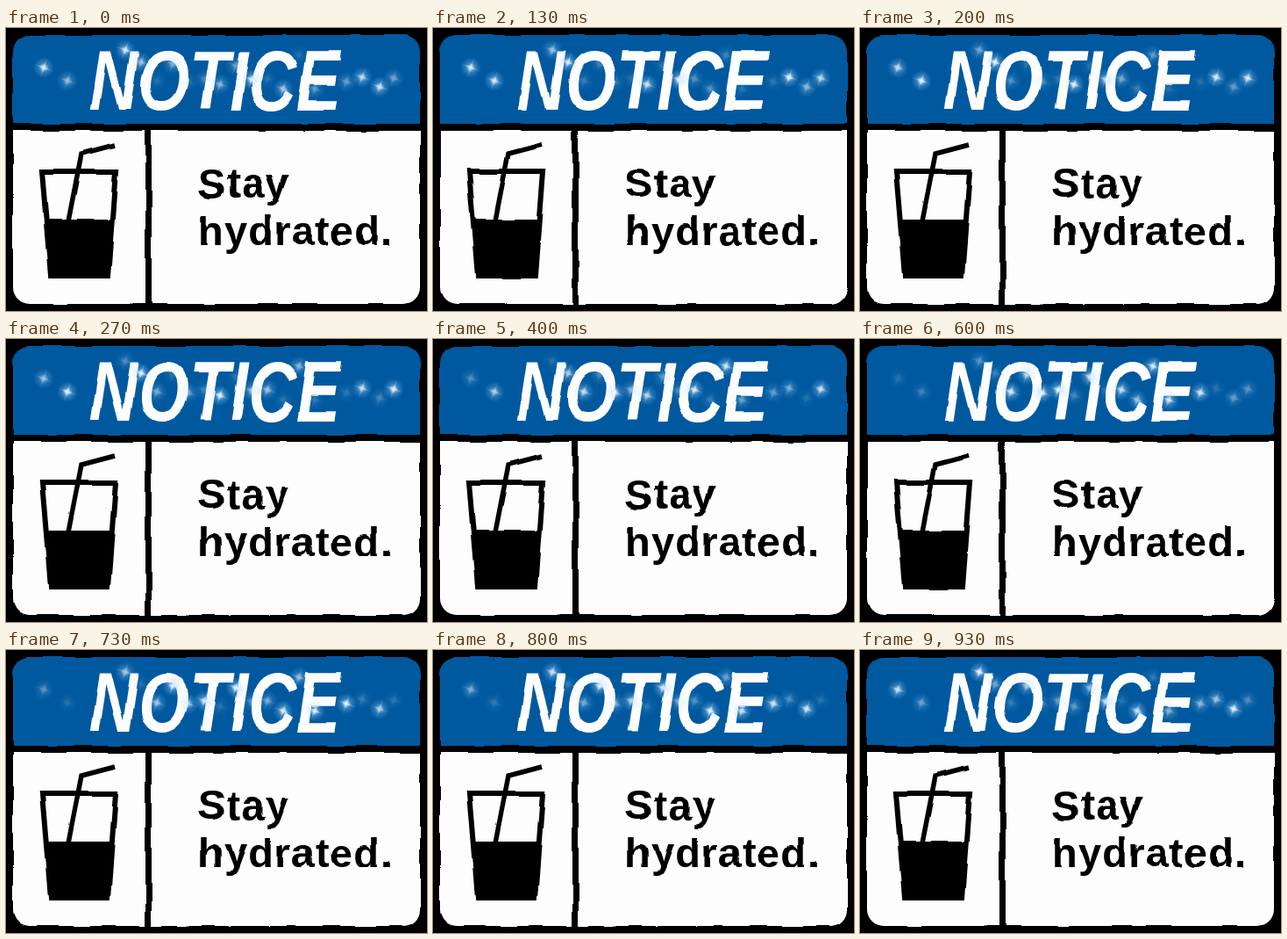
These frames come from a looping animation (480 by 322 pixels, 0.99 s). An HTML page:

```html
<!DOCTYPE html>
<html lang="en">
<head>
<meta charset="utf-8">
<title>Notice</title>
<style>
  html, body { margin: 0; width: 100%; height: 100%; overflow: hidden; background: #000; }
  svg { display: block; width: 100%; height: 100%; }
  text { font-family: "Liberation Sans", Arial, sans-serif; font-weight: bold; }
  .title { font-size: 97px; font-style: italic; fill: #fdfdfd; }
  .body { font-size: 47px; letter-spacing: 1.2px; }
</style>
</head>
<body>
<svg viewBox="0 0 480 322">
  <defs>
    <filter id="wobble" filterUnits="userSpaceOnUse" x="0" y="0" width="480" height="322" color-interpolation-filters="sRGB">
      <feTurbulence id="noise" type="fractalNoise" baseFrequency=".028" numOctaves="1" result="n"/>
      <feGaussianBlur in="SourceGraphic" stdDeviation=".55" result="soft"/>
      <feDisplacementMap in="soft" in2="n" scale="5" xChannelSelector="R" yChannelSelector="G"/>
      <feGaussianBlur stdDeviation=".35"/>
    </filter>
    <radialGradient id="glow">
      <stop offset="0" stop-color="#fff"/>
      <stop offset=".15" stop-color="#e4f2ff" stop-opacity=".85"/>
      <stop offset=".45" stop-color="#b4dcff" stop-opacity=".32"/>
      <stop offset="1" stop-color="#9cd0ff" stop-opacity="0"/>
    </radialGradient>
    <g id="star" fill="url(#glow)">
      <circle r="12"/>
      <path d="M0-13 1.2 -1.2 13 0 1.2 1.2 0 13 -1.2 1.2 -13 0 -1.2 -1.2Z" transform="rotate(20)"/>
    </g>
  </defs>
  <g filter="url(#wobble)">
    <rect width="480" height="322"/>
    <path fill="#00599f" d="M8 109V27A19 19 0 0 1 27 8H453A19 19 0 0 1 472 27V109Z"/>
    <path fill="#fdfdfd" d="M8 117H159V314H27A19 19 0 0 1 8 295ZM166 117H472V295A19 19 0 0 1 453 314H166Z"/>
    <text class="title" transform="translate(95.5 92.5) scale(.78 1)">NOTICE</text>
    <text class="body" x="219" y="193">Stay</text>
    <text class="body" x="219" y="247">hydrated.</text>
    <g fill="none" stroke="#000" stroke-width="6">
      <path d="M41 163H125L116 282H51Z"/>
      <path stroke-width="5.5" d="M71 220 86 143 124 133"/>
    </g>
    <path d="M45 218H122L118 284H49Z"/>
  </g>
  <g id="stars"></g>
</svg>
<script>
const LOOP = 990, STEP = 1000 / 15;

let seed = 7;
const random = () => (seed = seed * 16807 % 2147483647) / 2147483647;

// bright stars beside the title: x, y, phase of peak brightness
const stars = [
  [43, 45, .06], [70, 60, .22], [388, 61, .7],
  [406, 56, .14], [426, 67, .9], [442, 57, .28]
];
// a scatter of stars around the letters
for (let x = 136; x < 370; x += 18) stars.push([x, 25 + 48 * random(), random()]);

const noise = document.getElementById("noise");
const layer = document.getElementById("stars");
const sparkles = stars.map(([x, y, peak]) => {
  const el = document.createElementNS("http://www.w3.org/2000/svg", "use");
  el.setAttribute("href", "#star");
  el.setAttribute("transform", `translate(${x} ${y})`);
  layer.append(el);
  return { el, peak };
});

let shown = -1;
function draw(now) {
  const step = Math.floor((now % LOOP + 4) / STEP);
  if (step !== shown) {
    shown = step;
    // three poses, each held for two or three steps
    noise.setAttribute("seed", 3 + Math.floor((step + 2) / 2.5) % 3);
    for (const { el, peak } of sparkles) {
      const wave = .5 + .5 * Math.cos((step / 15 - peak) * 2 * Math.PI);
      el.setAttribute("opacity", (.15 + .8 * wave).toFixed(3));
    }
  }
  requestAnimationFrame(draw);
}
draw(performance.now());
</script>
</body>
</html>
```
